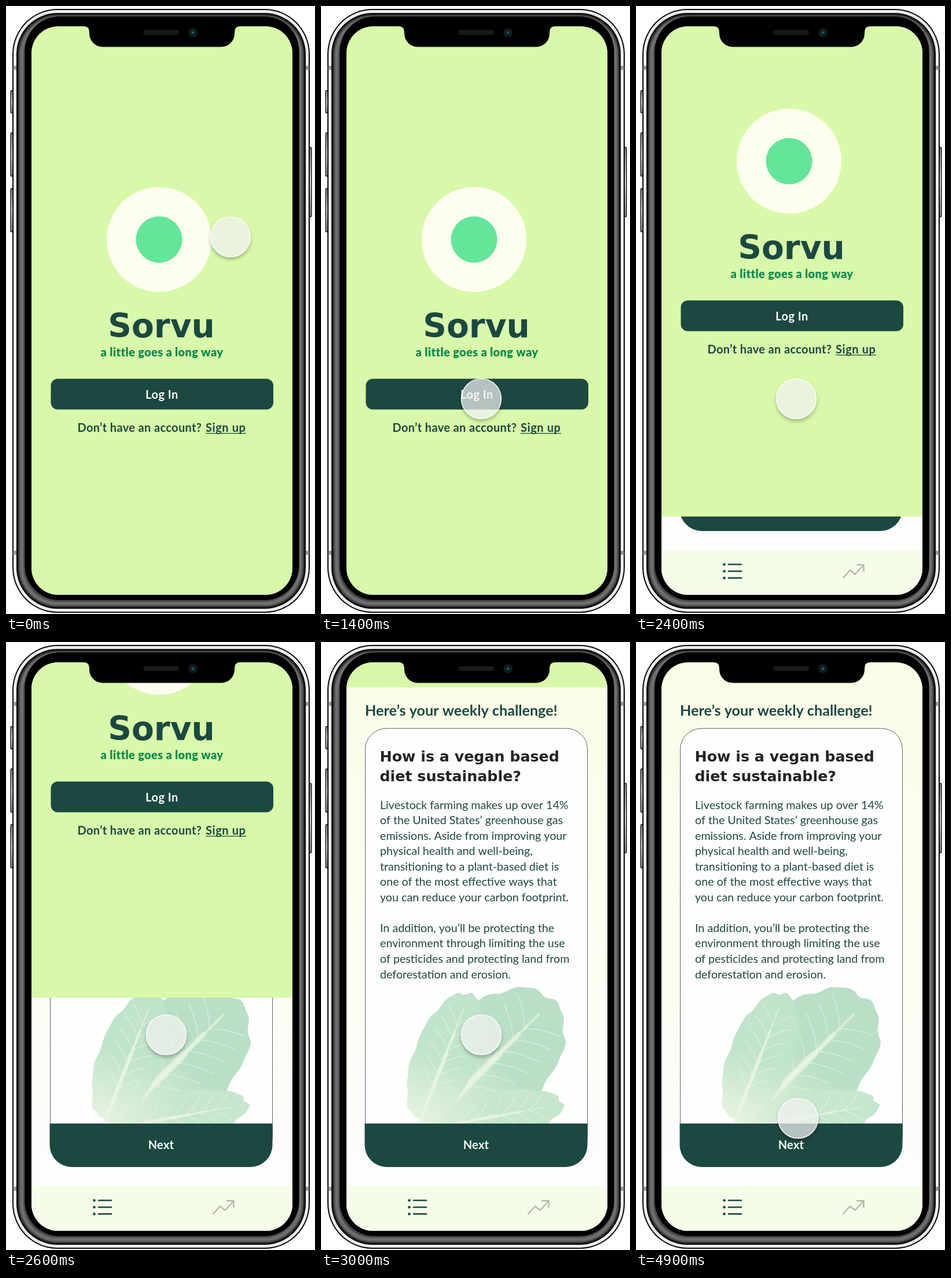
An HTML page with a canvas that plays this animation: 534x1048 px, repeating every 5 s.

```html
<!DOCTYPE html>
<html lang="en">
<head>
<meta charset="utf-8">
<title>Weekly challenge app</title>
<style>
html, body { margin: 0; width: 100%; height: 100%; overflow: hidden; background: #fff; }
canvas { display: block; width: 534px; height: 1048px; }
</style>
</head>
<body>
<canvas id="stage"></canvas>
<script>
const W = 534, H = 1048, LOOP = 5000, STEP = 100;
const DARK = '#1c4842', LIME = '#d8f9a9', CREAM = '#fefeee', GREY = '#b3bbae';
const SANS = 'Lato, "Open Sans", sans-serif';
const WIDE = '"DejaVu Sans", sans-serif';
const SCREEN = { x: 44, y: 35, w: 451, h: 980 };
const CENTER = SCREEN.x + SCREEN.w / 2;

const canvas = document.getElementById('stage');
const ratio = window.devicePixelRatio || 1;
canvas.width = W * ratio;
canvas.height = H * ratio;
const c = canvas.getContext('2d');
c.scale(ratio, ratio);
c.lineCap = c.lineJoin = 'round';

function box(x, y, w, h, r, fill) {
  c.beginPath();
  c.roundRect(x, y, w, h, r);
  c.fillStyle = fill;
  c.fill();
}

function disc(x, y, r, fill) {
  c.beginPath();
  c.arc(x, y, r, 0, Math.PI * 2);
  c.fillStyle = fill;
  c.fill();
}

function outline(color, width) {
  c.strokeStyle = color;
  c.lineWidth = width;
  c.stroke();
}

function line(pts, color, width) {
  c.beginPath();
  pts.forEach(p => c.lineTo(...p));
  outline(color, width);
}

function text(str, x, y, font, color, align = 'left', spacing = 0) {
  c.font = font;
  c.fillStyle = color;
  c.textAlign = align;
  c.letterSpacing = spacing + 'px';
  c.fillText(str, x, y);
}

// Linear gradient with evenly spaced colours.
function gradient(x0, y0, x1, y1, ...colors) {
  const g = c.createLinearGradient(x0, y0, x1, y1);
  colors.forEach((color, i) => g.addColorStop(i / (colors.length - 1), color));
  return g;
}

// An oval leaf with a frilly edge, a midrib and paired side veins.
function leaf(x, y, long, wide, angle, pale, deep) {
  c.save();
  c.translate(x, y);
  c.rotate(angle);
  c.beginPath();
  for (let a = 0; a < Math.PI * 2; a += .05) {
    const frill = 1 + .022 * Math.sin(9 * a) + .014 * Math.sin(17 * a + 1);
    c.lineTo(long * frill * Math.cos(a), wide * frill * Math.sin(a));
  }
  c.fillStyle = gradient(-long, 0, long, 0, pale, deep, deep);
  c.fill();
  const rib = 'rgba(236,246,228,.6)';
  for (let i = 1; i < 4; i++) line([[-long, 0], [long * (1.1 - i * .35), 0]], rib, wide * .045 * i);
  for (let u = -.5; u < .7; u += .2) {
    for (const side of [-1, 1]) {
      c.beginPath();
      c.moveTo(long * u, 0);
      c.quadraticCurveTo(long * (u + .14), side * wide * .2,
        long * (u + .24), side * wide * .62 * Math.sqrt(1 - u * u));
      outline(rib, 1.5);
    }
  }
  c.restore();
}

function lettuce() {
  c.save();
  c.beginPath();
  c.rect(77, 590, 383, 240);
  c.clip();
  leaf(302, 716, 140, 95, -Math.PI / 4, '#e2f1da', '#b9dfc7');
  leaf(298, 818, 122, 42, -.18, '#e4f1dc', '#c6e6cd');
  leaf(214, 716, 118, 54, -1.2, '#e6f3de', '#c0e3cb');
  c.restore();
}

const BODY = [
  'Livestock farming makes up over 14%',
  'of the United States’ greenhouse gas',
  'emissions. Aside from improving your',
  'physical health and well-being,',
  'transitioning to a plant-based diet is',
  'one of the most effective ways that',
  'you can reduce your carbon footprint.',
  '',
  'In addition, you’ll be protecting the',
  'environment through limiting the use',
  'of pesticides and protecting land from',
  'deforestation and erosion.'
];

function navBar() {
  box(44, 937.5, 451, 78, 0, '#f5fde9');
  for (let y = 962.5; y < 990; y += 11.7) {
    disc(152.5, y, 2.3, DARK);
    line([[160, y], [182, y]], DARK, 2.6);
  }
  line([[358, 985.5], [370, 972.5], [378.5, 979.5], [393, 964]], GREY, 2.5);
  line([[382, 963.2], [393.5, 963.2], [393.5, 974.5]], GREY, 2.5);
}

function challengePage() {
  box(44, 35, 451, 980, 0, gradient(0, 35, 0, 937, '#fafde6', '#fdfdf2', '#fefcfd'));
  text('Here’s your weekly challenge!', 76, 127, `bold 25.2px ${SANS}`, DARK);

  box(76.5, 149, 384, 738, 36, '#fffefe');
  outline('#5c6664', 1);
  lettuce();

  const title = `bold 25.3px ${WIDE}`;
  text('How is a vegan based', 101.5, 206, title, '#232327');
  text('diet sustainable?', 101.5, 240, title, '#232327');
  BODY.forEach((s, i) => text(s, 102, 287.5 + i * 26.55, `19.7px ${SANS}`, DARK));

  box(75.5, 830, 385, 75, [0, 0, 38, 38], DARK);
  text('Next', 268, 874, `bold 20px ${SANS}`, '#f6fbf6', 'center', .3);
  navBar();
}

function loginPage(shift) {
  c.save();
  c.translate(0, -shift);
  box(44, 35, 451, 980, 0, LIME);
  disc(264.5, 402.5, 90.5, CREAM);
  disc(264.5, 402.5, 40, '#63e59a');
  text('Sorvu', 268.5, 571, `bold 56.5px ${WIDE}`, DARK, 'center');
  text('a little goes a long way', CENTER, 603.5, `900 20px ${SANS}`, '#088d50', 'center', .35);
  box(77.5, 642.5, 384.5, 53, 12, DARK);
  const bold = `bold 20px ${SANS}`;
  text('Log In', CENTER, 677, bold, '#fbfdf8', 'center', .5);
  text('Don’t have an account?', 123.5, 734, bold, DARK, 'left', .35);
  text('Sign up', 345, 734, bold, DARK, 'left', .6);
  box(345, 736, 70, 1.3, 0, DARK);
  c.restore();
}

function pointer([x, y]) {
  const r = 34.5;
  c.save();
  c.beginPath();
  c.rect(0, 0, W, H);
  c.arc(x, y, r, 0, Math.PI * 2);
  c.clip('evenodd');
  c.shadowColor = 'rgba(0,0,0,.3)';
  c.shadowBlur = 6 * ratio;
  c.shadowOffsetY = 4 * ratio;
  disc(x, y, r, '#fff');
  c.restore();
  disc(x, y, r, 'rgba(241,241,242,.72)');
  outline('rgba(255,255,255,.85)', 1.6);
}

function sideKey(x, y, h) {
  box(x, y, 7.5, h, 2, '#161616');
  box(x + 1.5, y + 1.5, 4.5, h - 3, 1, gradient(0, y, 0, y + h, '#8a8a8c', '#e2e2e4', '#8a8a8c'));
}

// Nested shells from the outer rim inwards.
function phoneBody() {
  sideKey(7.5, 145, 40);
  sideKey(7.5, 218, 76);
  sideKey(7.5, 314, 76);
  sideKey(521, 243, 121);
  const shell = (inset, fill) =>
    box(11 + inset, 5 + inset, 514 - inset * 2, 1041 - inset * 2, 78 - inset, fill);
  shell(0, '#090909');
  shell(2, '#ececee');
  for (const x of [12.5, 516.5]) {
    for (const y of [103, 939]) box(x, y, 7, 7, 0, '#979799');
  }
  shell(7, '#0a0a0a');
  for (let i = 0; i < 7; i++) {
    const v = Math.round(36 + 78 * Math.sin(Math.PI * i / 7));
    shell(9 + i * 1.8, `rgb(${v},${v},${v + 2})`);
  }
  box(32.5, 18, 474, 1006, 60, '#000');
}

function notch() {
  c.beginPath();
  c.moveTo(135, 34);
  c.lineTo(135, 35);
  c.quadraticCurveTo(144, 35, 144, 46);
  c.arcTo(144, 70.5, 168, 70.5, 23);
  c.arcTo(395, 70.5, 395, 46, 23);
  c.lineTo(395, 46);
  c.quadraticCurveTo(395, 35, 404, 35);
  c.lineTo(404, 34);
  c.fillStyle = '#000';
  c.fill();
  box(237, 41.5, 62.5, 8.5, 4.2, '#181819');
  disc(323, 46, 8, '#15191b');
  disc(323, 46, 4.8, '#0b2328');
  disc(323, 46, 2.2, '#1f5a5c');
}

const progress = (t, from, to) => Math.min(1, Math.max(0, (t - from) / (to - from)));
const smooth = u => u * u * (3 - 2 * u);

function pointerAt(t) {
  const a = smooth(progress(t, 0, 800));
  const b = smooth(progress(t, 3700, 4900));
  return [388 - 111 * a + 3 * b, 398 + 279 * a + 144 * b];
}

function draw(t) {
  c.fillStyle = '#fff';
  c.fillRect(0, 0, W, H);
  phoneBody();
  c.save();
  c.beginPath();
  c.roundRect(SCREEN.x, SCREEN.y, SCREEN.w, SCREEN.h, 46);
  c.clip();
  const shift = Math.round(SCREEN.h * progress(t, 2299, 3032));
  if (shift > 0) challengePage();
  if (shift < SCREEN.h) loginPage(shift);
  pointer(pointerAt(t));
  c.restore();
  notch();
}

const start = performance.now();
function tick() {
  const t = (performance.now() - start) % LOOP;
  draw(Math.floor(t / STEP) * STEP);
  requestAnimationFrame(tick);
}
tick();
</script>
</body>
</html>
```
